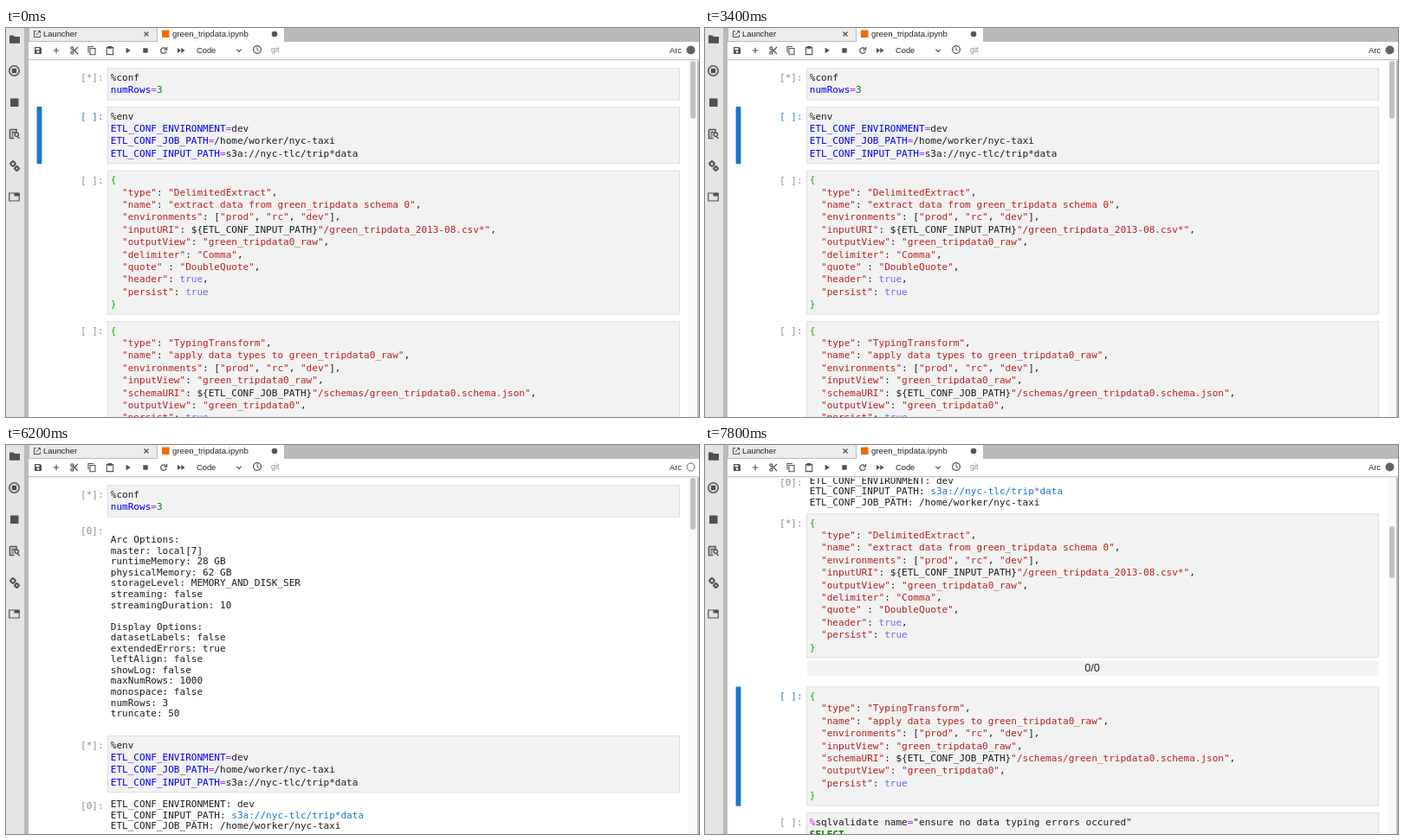
Write an HTML page with a canvas that moves like this. It is 800 by 450 pixels and loops after 8 s.

```html
<!DOCTYPE html>
<html>
<head>
<meta charset="utf-8">
<style>
  html, body { margin: 0; width: 100%; height: 100%; overflow: hidden; background: #fff; }
  canvas { display: block; }
</style>
</head>
<body>
<canvas id="stage" width="800" height="450"></canvas>
<script>
const ctx = document.getElementById('stage').getContext('2d');
const MONO = '11.04px "DejaVu Sans Mono", monospace';
const LOOP = 8000, CODE_LINE = 14.4, OUT_LINE = 12.56, GAP = 7.3;
const INK = '#1c1c1c', ICON = '#505050', BLUE = '#1976d2', FRAME = '#bababa';

const cells = [
  {
    code: ['%conf', 'numRows=3'],
    output: ['', 'Arc Options:', 'master: local[7]', 'runtimeMemory: 28 GB', 'physicalMemory: 62 GB',
      'storageLevel: MEMORY_AND_DISK_SER', 'streaming: false', 'streamingDuration: 10', '',
      'Display Options:', 'datasetLabels: false', 'extendedErrors: true', 'leftAlign: false',
      'showLog: false', 'maxNumRows: 1000', 'monospace: false', 'numRows: 3', 'truncate: 50', '']
  },
  {
    code: ['%env', 'ETL_CONF_ENVIRONMENT=dev', 'ETL_CONF_JOB_PATH=/home/worker/nyc-taxi',
      'ETL_CONF_INPUT_PATH=s3a://nyc-tlc/trip*data'],
    output: ['ETL_CONF_ENVIRONMENT: dev', 'ETL_CONF_INPUT_PATH: s3a://nyc-tlc/trip*data',
      'ETL_CONF_JOB_PATH: /home/worker/nyc-taxi']
  },
  {
    code: ['{', '  "type": "DelimitedExtract",', '  "name": "extract data from green_tripdata schema 0",',
      '  "environments": ["prod", "rc", "dev"],',
      '  "inputURI": ${ETL_CONF_INPUT_PATH}"/green_tripdata_2013-08.csv*",',
      '  "outputView": "green_tripdata0_raw",', '  "delimiter": "Comma",', '  "quote" : "DoubleQuote",',
      '  "header": true,', '  "persist": true', '}'],
    progress: '0/0'
  },
  {
    code: ['{', '  "type": "TypingTransform",', '  "name": "apply data types to green_tripdata0_raw",',
      '  "environments": ["prod", "rc", "dev"],', '  "inputView": "green_tripdata0_raw",',
      '  "schemaURI": ${ETL_CONF_JOB_PATH}"/schemas/green_tripdata0.schema.json",',
      '  "outputView": "green_tripdata0",', '  "persist": true', '}']
  },
  { code: ['%sqlvalidate name="ensure no data typing errors occured"', 'SELECT', '', ''], sql: true }
];

// started / finished count cells from the top of the notebook.
const states = [
  { at: 0, started: 1, finished: 0, active: 1, scroll: 0, busy: true, thumb: [38, 67] },
  { at: 5400, started: 1, finished: 1, active: 1, scroll: 0, busy: false, thumb: [38, 60] },
  { at: 6200, started: 2, finished: 2, active: -1, scroll: 0, busy: false, thumb: [38, 60] },
  { at: 6800, started: 3, finished: 3, active: 3, scroll: 374.6, busy: true, thumb: [94, 60] }
];

function rect(x, y, w, h, color) {
  ctx.fillStyle = color;
  ctx.fillRect(x, y, w, h);
}

function roundRect(x, y, w, h, r, color) {
  ctx.fillStyle = color;
  ctx.beginPath();
  ctx.roundRect(x, y, w, h, r);
  ctx.fill();
}

function text(str, x, y, color = INK, font = MONO) {
  ctx.font = font;
  ctx.fillStyle = color;
  ctx.fillText(str, x, y);
}

const label = (str, x, y, size, color = '#222') =>
  text(str, x, y, color, `${size}px "Liberation Sans", Arial, sans-serif`);

function circle(x, y, r, color, filled = true) {
  ctx.beginPath();
  ctx.arc(x, y, r, 0, 7);
  ctx.fillStyle = ctx.strokeStyle = color;
  filled ? ctx.fill() : ctx.stroke();
}

// Icon paths are relative to their centre.
function icon(x, y, path, filled = false, color = ICON, width = 1.2) {
  ctx.save();
  ctx.translate(x, y);
  ctx.fillStyle = ctx.strokeStyle = color;
  ctx.lineWidth = width;
  const shape = new Path2D(path);
  filled ? ctx.fill(shape, 'evenodd') : ctx.stroke(shape);
  ctx.restore();
}

function tokens(line, sql) {
  if (/^[{}]$/.test(line)) return [[line, '#00b400']];
  const parts = sql ? /[%=]|SELECT/g : /"[^"]*"|true|^\w+(?==)|=|(?<==)\d+$/g;
  const colorOf = part =>
    part[0] === '"' ? '#ba2121' :
    part === 'true' ? '#6a6af0' :
    /^[%=]$/.test(part) ? '#aa22ff' :
    part === 'SELECT' || /^\d/.test(part) ? '#008000' : '#0000f0';
  const result = [];
  let end = 0;
  for (const match of line.matchAll(parts)) {
    result.push([line.slice(end, match.index), INK], [match[0], colorOf(match[0])]);
    end = match.index + match[0].length;
  }
  return [...result, [line.slice(end), INK]];
}

function codeLine(line, y, sql) {
  let x = 120.8;
  for (const [part, color] of tokens(line, sql)) {
    const font = part === 'SELECT' ? 'bold ' + MONO : MONO;
    text(part, x, y, color, font);
    x += ctx.measureText(part).width;
  }
}

function drawOutput(lines, y) {
  text('[0]:', 86, y + 18.9, '#8c8c8c');
  lines.forEach((line, i) => {
    const baseline = y + 16.9 + i * OUT_LINE;
    const link = line.indexOf('s3a:');
    const plain = link < 0 ? line : line.slice(0, link);
    text(plain, 120.8, baseline);
    if (link >= 0) text(line.slice(link), 120.8 + ctx.measureText(plain).width, baseline, BLUE);
  });
  return lines.length * OUT_LINE + 6.4;
}

function drawNotebook(state) {
  let y = 46.2 - state.scroll;
  cells.forEach((cell, i) => {
    const height = cell.code.length * CODE_LINE + 8.7;
    const active = i === state.active;
    if (active) roundRect(35.6, y, 5.8, height, 1, BLUE);
    rect(117, y, 661, height, '#dfdfdf');
    rect(118, y + 1, 659, height - 2, '#f2f2f2');
    text(i < state.started ? '[*]:' : '[ ]:', 86, y + 14.9, active ? '#307fc1' : '#8c8c8c');
    cell.code.forEach((line, n) => codeLine(line, y + 14.5 + n * CODE_LINE, cell.sql));
    y += height;
    if (i < state.finished) {
      if (cell.progress) {
        rect(118, y + 3.5, 660, 17, '#f2f2f2');
        label(cell.progress, 438.2, y + 16.2, 12.6);
        y += 25.9;
      } else {
        y += drawOutput(cell.output, y);
      }
    }
    y += GAP;
  });
}

function drawTabs() {
  rect(26, 0, 774, 16, FRAME);
  rect(27, 0, 147, 15, '#ececec');
  rect(175, 0, 146, 16, '#fff');
  icon(36, 7, 'M-1-3.5H-3.5V3.5H3.5V1M1-3.5H3.5V-1M3.5-3.5L-1 1', false, ICON, 1);
  label('Launcher', 43, 10, 9.4);
  icon(162, 7, 'M-2.5-2.5L2.5 2.5M2.5-2.5L-2.5 2.5');
  rect(180, 2.5, 8.5, 8.5, '#ef6c00');
  label('green_tripdata.ipynb', 192, 10, 9.65);
  circle(310, 7, 3.3, '#555');
}

function drawToolbar(busy) {
  rect(26, 16, 774, 20, '#fff');
  rect(26, 36, 774, 1, '#c8c8c8');
  rect(26, 37, 774, 1, '#ededed');
  icon(37, 26, 'M-4-4H2.5L4-2.5V4H-4ZM-2.7-2.8V-.8H1.5V-2.8ZM0 .2A1.4 1.4 0 1 0 .01 .2Z', true);
  icon(58, 26, 'M-3.3 0H3.3M0-3.3V3.3');
  icon(79, 26, 'M-2-2L4 4M-2 2L4-4M-4.2-2.7a1.5 1.5 0 1 0 3 0a1.5 1.5 0 1 0-3 0M-4.2 2.7a1.5 1.5 0 1 0 3 0a1.5 1.5 0 1 0-3 0');
  icon(99, 26, 'M-4 2.5V-4.5H2M-2-2.5H4V4.7H-2Z', false, ICON, 1.1);
  icon(120, 26, 'M-3.7-3.5H3.7V4.6H-3.7ZM-1.8-4.5H1.8V-2.2H-1.8Z', false, ICON, 1.1);
  icon(141, 26, 'M-2.4-3.2L2.9 0L-2.4 3.2Z', true);
  icon(161, 26, 'M-2.7-2.7H2.7V2.7H-2.7Z', true);
  icon(182, 26, 'M2.5-2A3.3 3.3 0 1 0 3.2 .8M3.6-4V-.9H.5');
  icon(202, 26, 'M-4-3L0 0L-4 3ZM.3-3L4.5 0L.3 3Z', true);
  label('Code', 220, 29, 9.3);
  icon(269, 26, 'M-2.7-1.3L0 1.4L2.7-1.3');
  ctx.lineWidth = 1.2;
  circle(290, 25, 4.4, ICON, false);
  icon(290, 25, 'M0-2.8V.3L2 1.5', false, ICON, 1);
  label('git', 306, 28, 9, '#8a8a8a');
  label('Arc', 766, 29, 9.3);
  ctx.lineWidth = 1;
  circle(790.5, 25.5, busy ? 5 : 4.5, '#616161', busy);
}

function drawSidebar() {
  rect(0, 0, 21, 450, '#e4e4e4');
  rect(21, 0, 5, 450, FRAME);
  icon(10, 13, 'M-6-4.5H-1.5L0-3H6V4.7H-6Z', true);
  circle(9.5, 49.5, 6.5, ICON);
  circle(9.5, 49.5, 4.9, '#e4e4e4');
  rect(6.8, 46.8, 5.4, 5.4, ICON);
  rect(5, 81.5, 9.5, 9.5, ICON);
  icon(9.5, 122.5, 'M-5-5H2.5V-2M-5-5V5H0M-3-2H1M-3 0H-1M-3 2.5H-1M2.8-1.5a2.2 2.2 0 1 0 .01 0M4 3L6 5.5', false, ICON, 1.5);
  for (const [x, y, r] of [[8, 157, 2.4], [12.5, 162.5, 2]]) {
    ctx.lineWidth = 1.8;
    circle(x, y, r, ICON, false);
    icon(x, y, `M${-r - 1.6} 0H${-r}M${r} 0H${r + 1.6}M0 ${-r - 1.6}V${-r}M0 ${r}V${r + 1.6}`, false, ICON, 1.6);
  }
  icon(9.5, 195.5, 'M-5.7-4.5H5.7V4.5H-5.7Z');
  rect(9.5, 191, 6, 3.5, ICON);
}

function draw(now) {
  const time = now % LOOP;
  const state = states.findLast(s => s.at <= time);
  rect(0, 0, 800, 450, '#fff');
  drawNotebook(state);
  rect(788, 37, 10, 413, '#f8f8f8');
  rect(798, 37, 2, 413, FRAME);
  roundRect(790, state.thumb[0], 6, state.thumb[1], 3, '#c1c1c1');
  drawTabs();
  drawToolbar(state.busy);
  drawSidebar();
}

const start = performance.now();
function frame() {
  draw(performance.now() - start);
  requestAnimationFrame(frame);
}
frame();
</script>
</body>
</html>
```
